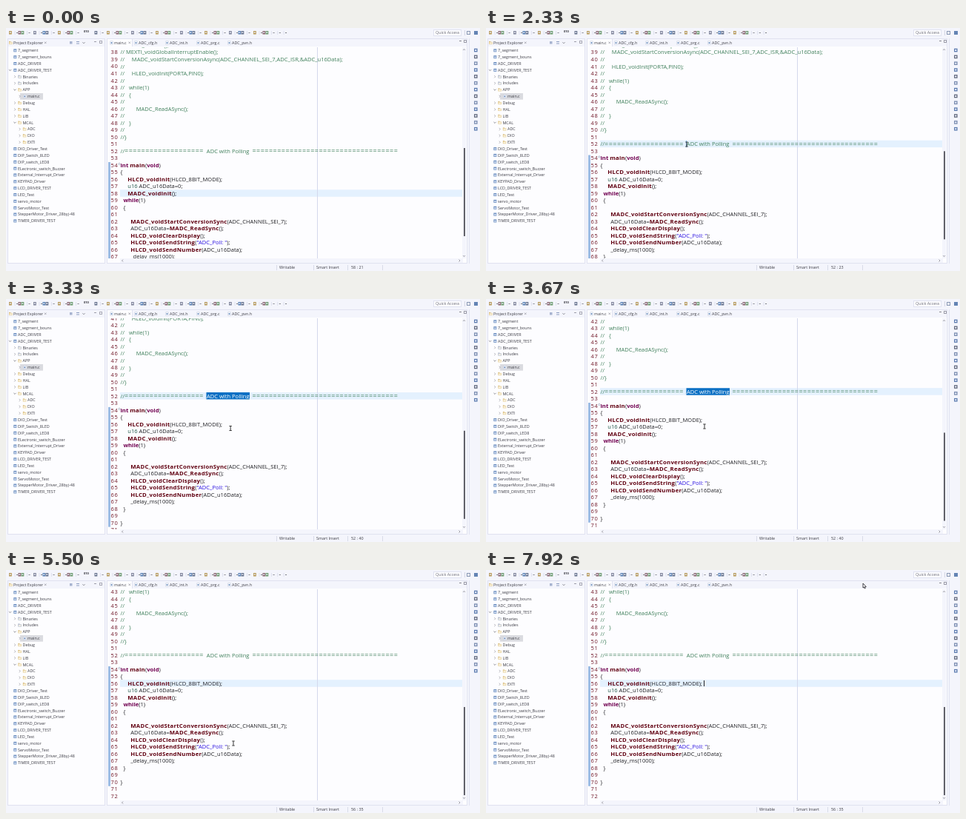
Write an HTML page with a canvas that moves like this. It is 640 px wide and 328 px high and loops after 8 s.

```html
<!DOCTYPE html>
<html lang="en">
<head>
<meta charset="utf-8">
<style>
html, body { margin: 0; width: 640px; height: 328px; overflow: hidden; background: #f4f5fc; }
canvas { display: block; }
</style>
</head>
<body>
<canvas id="stage" width="640" height="328"></canvas>
<script>
const g = document.getElementById("stage").getContext("2d");
const LOOP = 8000, PITCH = 9.515, ROW = 8.85, CODE_X = 154.5, FIRST = 37;
const CHROME = "#f4f5fc", PAPER = "#fdfdff", EDGE = "#e0e2f0";
const INK = "#3c3c44", GREEN = "#41805c", NAME = "#600010", KEYWORD = "#700050";

const code = `//  HLCD_voidInit();
// MEXTI_voidGlobalInterruptEnable();
//     MADC_voidStartConversionAsync(ADC_CHANNEL_SEI_7,ADC_ISR,&ADC_u16Data);
//
//     HLED_voidInit(PORTA,PIN0);
//
//   while(1)
//   {
//
//        MADC_ReadASync();
//
//   }
//
//}

//${"=".repeat(19)}  ADC with Polling  ${"=".repeat(35)}

int main(void)
{
     HLCD_voidInit(HLCD_8BIT_MODE);
     u16 ADC_u16Data=0;
     MADC_voidInit();
  while(1)
  {

       MADC_voidStartConversionSync(ADC_CHANNEL_SEI_7);
       ADC_u16Data=MADC_ReadSync();
       HLCD_voidClearDisplay();
       HLCD_voidSendString("ADC_Poll: ");
       HLCD_voidSendNumber(ADC_u16Data);
       _delay_ms(1000);
  }

}

`.split("\n");

// depth, icon kind (p project, b plain, f folder, c file), label
const tree = `0p7_segment 0p7_segment_bouns 0pADC_DRIVER 0pADC_DRIVER_TEST 1bBinaries 1bIncludes
1fAPP 2cmain.c 1fDebug 1fHAL 1fLIB 1fMCAL 2fADC 2fDIO 2fEXTI 0pDIO_Driver_Test 0pDIP_Switch_8LED
0pDIP_switch_LED8 0pELectronic_switch_Buzzer 0pExternal_Interrupt_Driver 0pKEYPAD_Driver
0pLCD_DRIVER_TEST 0pLED_Test 0pservo_motor 0pServoMotor_Test 0pStepperMotor_Driver_28byj-48
0pTIMER_DRIVER_TEST`.split(/\s+/);
const opened = ["ADC_DRIVER_TEST", "APP", "MCAL"];

const mousePath = [[1580, 430, 331], [2150, 271, 157], [2350, 271, 157], [2750, 328, 157],
  [3000, 311, 177], [3670, 295, 172], [4300, 295, 153], [4650, 296, 154], [5500, 307, 234],
  [6100, 290, 190], [6750, 62, 8], [7080, 56, 9], [7300, 56, 9], [7920, 510, 20], [8000, 512, 20]];
const scrollPath = [[1800, 0], [2000, 9.5], [3150, 9.5], [3400, 41], [3700, 41], [3850, 51]];

function along(path, t) {
  if (t <= path[0][0]) return path[0].slice(1);
  for (let i = 1; i < path.length; i++) {
    const [t0, ...a] = path[i - 1], [t1, ...b] = path[i];
    if (t < t1) {
      const u = (t - t0) / (t1 - t0), e = u * u * (3 - 2 * u);
      return a.map((v, k) => v + (b[k] - v) * e);
    }
  }
  return path[path.length - 1].slice(1);
}

function box(x, y, w, h, fill) { g.fillStyle = fill; g.fillRect(x, y, w, h); }

function frame(x, y, w, h, color = EDGE) {
  g.strokeStyle = color;
  g.lineWidth = 1;
  g.strokeRect(x + .5, y + .5, w - 1, h - 1);
}

function stroke(color, width, ...pts) {
  g.strokeStyle = color;
  g.lineWidth = width;
  g.beginPath();
  pts.forEach(([x, y]) => g.lineTo(x, y));
  g.stroke();
}

// Draws text centred on y and returns the x where it ends.
function write(s, x, y, color = INK, size = 5.4, weight = 400, gap = 0) {
  g.font = `${weight} ${size}px "Open Sans", "Noto Sans", sans-serif`;
  g.letterSpacing = gap + "px";
  g.fillStyle = color;
  g.fillText(s, x, y + size * .36);
  return x + g.measureText(s).width;
}

function chevron(x, y, open) {
  if (open) stroke("#60606a", .7, [x - 1.6, y - .8], [x, y + .8], [x + 1.6, y - .8]);
  else stroke("#92929c", .7, [x - .8, y - 1.6], [x + .8, y], [x - .8, y + 1.6]);
}

function icon(kind, x, y) {
  if (kind === "c") {
    box(x - 1.5, y - 2.5, 4, 5, "#c3ccdc");
    box(x - 1, y - 2, 3, 4, "#f4f6fc");
    box(x - .3, y - .8, 1.6, 1.8, "#5a80b4");
  } else if (kind === "p") {
    box(x - 1.5, y - 2, 4, 4, "#6d8fc0");
    box(x - .8, y - .6, 2.8, 1.8, "#cfdcf0");
  } else {
    box(x - 2, y - 2, 2.2, 1, kind === "b" ? "#9aa4b8" : "#d3b370");
    box(x - 2, y - 1.2, 4.6, 3.2, kind === "b" ? "#b4bccc" : "#e6cd92");
    box(x - 1.2, y - .4, 3.2, 1.7, "#fbf6e6");
  }
}

function drawToolbar(t) {
  if (t > 6750 && t < 7400) {
    box(51, 2, 15, 9, "#d8e6f8");
    frame(51, 2, 15, 9, "#a4c0e4");
  }
  const hues = ["#b89a58", "#64708a", "#5880b4", "#80849a", "#6a9a6c", "#8a6470"];
  for (let i = 0; i < 46; i++) {
    const x = 4 + i * 8.25;
    if (i === 12 || i === 13) continue;
    if (i % 2 || i > 42) {
      box(x - .5, 4, .6, 5, "#d0d4e4");
      stroke("#55565f", .8, [x + 1.8, 6], [x + 2.8, 7], [x + 3.8, 6]);
    }
    if (i % 4 !== 3 && i < 43) {
      box(x + (i % 2 ? 4.2 : 0), 4, 3.8, 4.5, hues[(i * 5 + (i >> 2)) % 6]);
      box(x + (i % 2 ? 5 : .8), 5.2, 2, 1.6, "#e6eaf6");
    }
  }
  write("010", 105, 5, "#35353c", 4, 700);
  box(577, 2, 38, 9, PAPER);
  frame(577, 2, 38, 9);
  write("Quick Access", 580, 6.5, "#6c6c76");
  box(619, 3, .7, 7, "#c4c8d8");
  frame(622, 4, 5, 5, "#8a98b4");
  box(632, 4, 5, 5, "#6484b4");
}

function drawExplorer() {
  box(2, 14, 132, 304, PAPER);
  box(2, 14, 132, 11, CHROME);
  frame(2, 14, 132, 304);
  icon("f", 6, 20);
  write("Project Explorer", 10, 20);
  stroke("#85858f", .6, [52, 18.5], [54.5, 21]);
  stroke("#85858f", .6, [54.5, 18.5], [52, 21]);
  box(86, 18, 3.5, 3.5, "#a8b4d0");
  stroke("#8c9cc0", 1, [95, 18.5], [99, 18.5]);
  stroke("#8c9cc0", 1, [95, 21], [99, 21]);
  chevron(105, 20, true);
  box(119, 18, 3, 1, "#9c9ca8");
  frame(126, 17, 4, 4, "#a8a8b4");

  tree.forEach((item, i) => {
    const depth = +item[0], kind = item[1], label = item.slice(2);
    const x = 16 + depth * 6.5, y = 30.3 + i * ROW;
    if (label === "main.c") box(19, y - 4.2, 31, 8.6, "#dadbe0");
    if (depth || label === "ADC_DRIVER_TEST") chevron(x - 10.5, y, opened.includes(label));
    icon(kind, x - 4.2, y);
    write(label, x, y);
  });
}

function drawTabs() {
  box(136, 14, 487, 304, PAPER);
  box(136, 14, 487, 11, CHROME);
  frame(136, 14, 487, 304);
  box(137, 15, 33, 11, PAPER);
  box(170, 15, 1, 10, EDGE);
  const names = ["main.c", "ADC_cfg.h", "ADC_int.h", "ADC_prg.c", "ADC_pvn.h"];
  names.forEach((name, i) => {
    const x = i ? 137 + i * 42 : 146;
    icon("c", x - 4, 20);
    write(name, x, 20);
  });
  stroke("#85858f", .6, [165.5, 18.5], [168, 21]);
  stroke("#85858f", .6, [168, 18.5], [165.5, 21]);
  box(612, 17, 3, 1, "#85858f");
  frame(618, 16, 4, 4, "#9c9ca8");
}

function writeCode(s, y) {
  let x = CODE_X;
  if (s.startsWith("//")) {
    for (const part of s.match(/=+|[^=]+/g))
      x = part[0] === "=" ? write(part, x, y, GREEN, 9, 400, .48) : write(part, x, y, GREEN, 7.55);
    return;
  }
  for (const m of s.matchAll(/"[^"]*"|\w+|[^\w"]+/g)) {
    const word = m[0], call = s[m.index + word.length] === "(" && /^[A-Za-z]/.test(word);
    if (/^(int|void|while)$/.test(word)) x = write(word, x, y, KEYWORD, 7.7, 700);
    else if (call) x = write(word, x, y, NAME, 7.8, 700, .22);
    else x = write(word, x, y, word[0] === '"' ? "#2a10e0" : word === "u16" ? "#205848" : "#202024", 7.55);
  }
}

function drawEditor(t, mouse) {
  const [scroll] = along(scrollPath, t);
  const rowY = n => 185 + (n - 54) * PITCH - scroll;
  const active = t < 2300 ? 58 : t < 4350 ? 52 : 56;
  g.save();
  g.beginPath();
  g.rect(137, 26, 485, 285);
  g.clip();

  box(154, rowY(active) - 4.8, 462, 9.5, "#e4f1fe");
  box(138, rowY(54) - 4, 3, 17 * PITCH, "#9cbce4");
  box(420, 26, 1, 285, "#d4d8ec");
  code.forEach((line, i) => {
    const n = FIRST + i, y = rowY(n);
    if (y < 16 || y > 318) return;
    write(String(n), 141.5, y, "#701828", 7.5, 400, .6);
    writeCode(line, y);
  });
  g.strokeStyle = "#8b98b0";
  g.lineWidth = .6;
  g.beginPath();
  g.arc(153, rowY(54) - 1.5, 1.2, 0, 7);
  g.stroke();

  if (active === 52) {
    const end = t < 2750 ? Math.max(271, mouse[0]) : 329;
    g.save();
    g.beginPath();
    g.rect(270.5, rowY(52) - 4.8, end - 270.5, 9.5);
    g.clip();
    box(270, rowY(52) - 5, 60, 10, "#0c70c4");
    write("ADC with Polling", 271, rowY(52), "#ffffff", 7.55);
    g.restore();
  }
  if (active === 56 && (t + 660) % 1060 < 530) box(294, rowY(56) - 4, 1, 8, "#222");
  g.restore();

  box(154, 311, 463, 6, CHROME);
  box(616, 26, 5, 285, CHROME);
  box(618, 162 + scroll * .45, 2, 119, "#62626a");
  stroke("#75757f", .7, [158, 312.5], [156.5, 314], [158, 315.5]);
  stroke("#75757f", .7, [611.5, 312.5], [613, 314], [611.5, 315.5]);
  stroke("#75757f", .7, [617, 30], [618.5, 28.5], [620, 30]);
  stroke("#75757f", .7, [617, 307], [618.5, 308.5], [620, 307]);

  const col = active === 58 ? 21 : active === 56 ? 35
    : t < 2750 ? Math.round(23 + 17 * Math.max(0, mouse[0] - 271) / 57) : 40;
  box(0, 319, 640, 9, CHROME);
  [365, 415, 461, 508].forEach(x => box(x, 320, .7, 7, "#ccd0e0"));
  write("Writable", 369, 323.5);
  write("Smart Insert", 419, 323.5);
  write(`${active} : ${col}`, 466, 323.5);
}

function drawSideBar() {
  box(624, 13, 16, 306, CHROME);
  box(625, 14, 1, 304, EDGE);
  for (let i = 0; i < 13; i++) {
    const y = 30 + i * 8.85;
    box(632, y - 2.3, 4.6, 4.6, ["#5c7cb0", "#62687c", "#7a8cb0"][i % 3]);
    box(633, y - 1, 2.4, 2, "#e4e9f6");
  }
}

function drawMouse(t, [x, y]) {
  if (t < 1580) return;
  if (y < 26) {
    g.beginPath();
    [[0, -2], [0, 4], [1.4, 3], [2.3, 5], [3.3, 4.5], [2.5, 2.7], [4.3, 2.6]]
      .forEach(([dx, dy]) => g.lineTo(x - 1 + dx, y + dy));
    g.closePath();
    g.fillStyle = "#ffffff";
    g.fill();
    g.strokeStyle = "#303038";
    g.lineWidth = .9;
    g.stroke();
  } else {
    stroke("#222", .9, [x, y - 2.8], [x, y + 2.8]);
    stroke("#222", .9, [x - 1.7, y - 3], [x + 1.7, y - 3]);
    stroke("#222", .9, [x - 1.7, y + 3], [x + 1.7, y + 3]);
  }
}

function draw(now) {
  const t = now % LOOP, mouse = along(mousePath, t);
  box(0, 0, 640, 328, CHROME);
  drawToolbar(t);
  drawExplorer();
  drawTabs();
  drawEditor(t, mouse);
  drawSideBar();
  drawMouse(t, mouse);
}

const start = performance.now();
function tick() {
  draw(performance.now() - start);
  requestAnimationFrame(tick);
}
tick();
</script>
</body>
</html>
```
